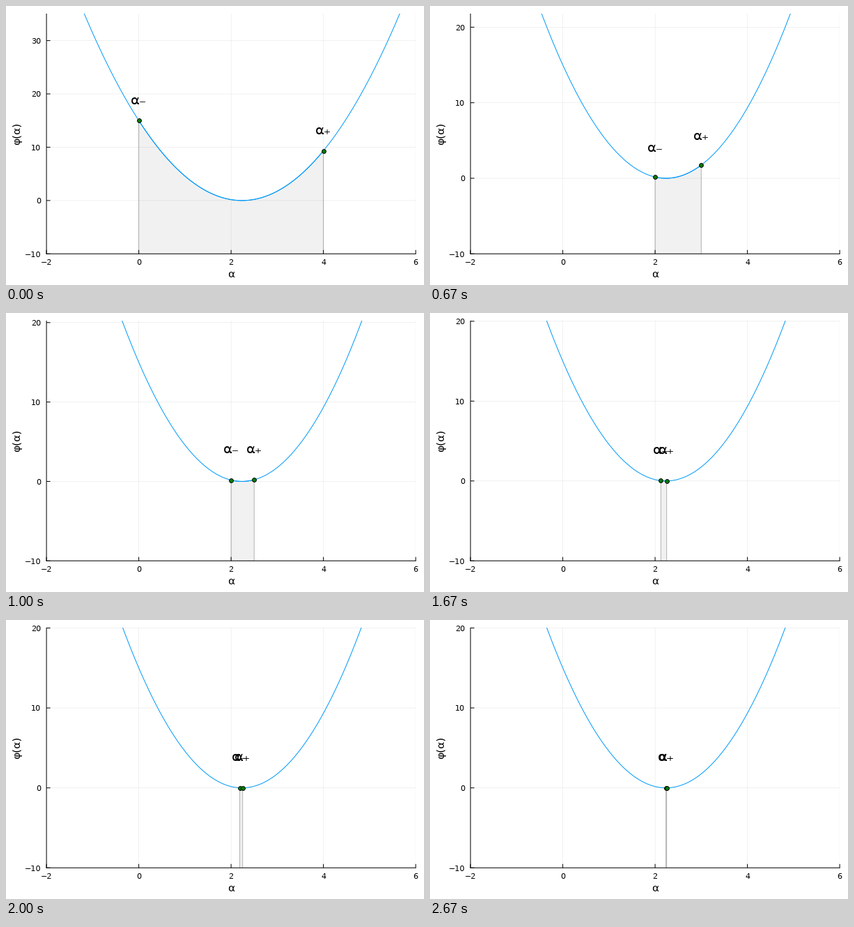
A matplotlib script for the animation above (3010 ms loop, 600 px wide and 400 px high).

```python
import numpy as np
import matplotlib.pyplot as plt
from matplotlib.animation import FuncAnimation
from matplotlib.transforms import Affine2D

W, H, DPI = 600, 400, 100
LEFT, RIGHT, TOP, BOTTOM = 58.1, 588.1, 11.4, 355.3
PX = 72 / DPI
ROOT = np.sqrt(5)
XLIM, FLOOR = (-2, 6), -10
TICK = 5.5
BLUE = "#009afa"
STEPS = 9

plt.rcParams.update({"font.family": "DejaVu Sans", "text.hinting": "default",
                     "path.snap": False})


def phi(a):
    return 3 * (a - ROOT) ** 2


def bisect(lo, hi, n):
    """Brackets of the minimum, halved by the sign of the slope."""
    out = [(lo, hi)]
    while len(out) < n:
        mid = (lo + hi) / 2
        lo, hi = (mid, hi) if mid < ROOT else (lo, mid)
        out.append((lo, hi))
    return out


brackets = bisect(0, 4, STEPS)

fig = plt.figure(figsize=(W / DPI, H / DPI), dpi=DPI, facecolor="white")
ax = fig.add_axes([LEFT / W, 1 - BOTTOM / H,
                   (RIGHT - LEFT) / W, (BOTTOM - TOP) / H])
ax.set_xlim(XLIM)
ax.set_axisbelow(True)
ax.spines[["top", "right"]].set_visible(False)
ax.spines[["left", "bottom"]].set_linewidth(PX)
ax.tick_params(length=0, labelleft=False, labelbottom=False)
ax.grid(color="black", alpha=0.1, lw=0.55 * PX)
ax.set_xticks(range(-2, 7, 2))

pixels = Affine2D().scale(1, -1).translate(0, H)


def put(x, y, s, size, ha="center", **kw):
    """Text in pixels from the top left, y being the baseline."""
    return ax.text(x, y, s, size=size, ha=ha, va="baseline",
                   transform=pixels, zorder=6, **kw)


def tick(xs, ys, transform):
    return ax.plot(xs, ys, color="black", lw=PX, clip_on=False,
                   solid_capstyle="butt", transform=transform)[0]


def to_x(a):
    return LEFT + (a - XLIM[0]) / (XLIM[1] - XLIM[0]) * (RIGHT - LEFT)


def to_y(v, top):
    return BOTTOM - (v - FLOOR) / (top - FLOOR) * (BOTTOM - TOP)


def num(v):
    return str(v).replace("-", "\u2212")


for v in range(-2, 7, 2):
    put(to_x(v), 371, num(v), 8)
    tick([v, v], [0, TICK / (BOTTOM - TOP)], ax.get_xaxis_transform())
put(to_x(2), 389, "α", 11)
put(23, (TOP + BOTTOM) / 2 - 0.7, "φ(α)", 11, rotation=90).set(
    ha="right", va="center")

y_marks = {}
for v in range(-10, 31, 10):
    y_marks[v] = (put(50.3, 0, num(v), 8, ha="right"),
                  tick([0, TICK / (RIGHT - LEFT)], [v, v],
                       ax.get_yaxis_transform()))

xs = np.linspace(*XLIM, 301)
ax.plot(xs, phi(xs), color=BLUE, lw=PX, zorder=2)
area, = ax.fill([0], [0], color="black", alpha=0.055, lw=0, zorder=2.5)
part, = ax.plot([], [], color=BLUE, lw=PX, zorder=3)
stems = [ax.plot([], [], color="black", alpha=0.28, lw=PX, zorder=4)[0]
         for _ in range(2)]
dots = ax.scatter([0, 0], [0, 0], s=(5.8 * PX) ** 2, fc="green", ec="black",
                  lw=0.95 * PX, zorder=5)
names = [put(0, 0, s, 14) for s in ("α₋", "α₊")]


def draw(i):
    lo, hi = ends = brackets[min((3 * i + 1) // 100, STEPS - 1)]
    vals = [phi(a) for a in ends]
    top = 20 + max(vals)
    ax.set_ylim(FLOOR, top)
    ax.set_yticks([v for v in y_marks if v <= top])
    for v, (label, mark) in y_marks.items():
        label.set_visible(v <= top)
        mark.set_visible(v <= top)
        label.set_y(to_y(v, top) + 4.4)

    seg = np.linspace(lo, hi, 80)
    part.set_data(seg, phi(seg))
    area.set_xy(np.column_stack([np.r_[lo, seg, hi],
                                 np.r_[FLOOR, phi(seg), FLOOR]]))
    dots.set_offsets(np.column_stack([ends, vals]))
    for a, v, stem, name in zip(ends, vals, stems, names):
        stem.set_data([a, a], [FLOOR, v])
        name.set_position((to_x(a), to_y(v + 4, top) + 7.4))
    return ()


anim = FuncAnimation(fig, draw, frames=301, interval=10, repeat=True,
                     repeat_delay=0, blit=False)
plt.show()
```
